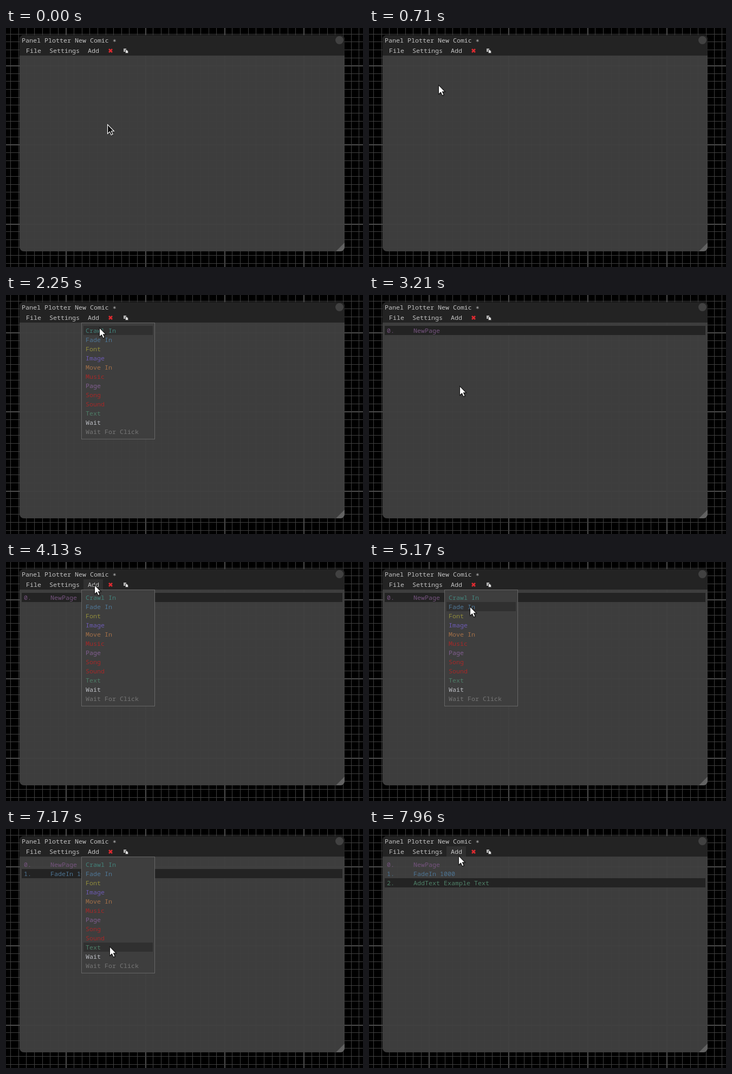
An HTML page with a canvas for the animation above (8000 ms loop, 659x442 px).

```html
<!DOCTYPE html>
<html lang="en">
<head>
<meta charset="utf-8">
<title>Comic editor</title>
<style>
html, body { margin: 0; width: 100%; height: 100%; overflow: hidden; background: #000; }
canvas { display: block; }
</style>
</head>
<body>
<canvas id="stage" width="659" height="442"></canvas>
<script>
const ctx = document.getElementById('stage').getContext('2d');
const LOOP = 8000, CHAR = 7, ROW = 17, ROW_TOP = 57, BAR_TOP = 32, BAR_END = 51;
const PLAIN = '#c4c4c4', PANEL = '#3e3e3e', HOVER = '#303030', DARK = '#232323';

const plain = labels => labels.map(label => ({ label, color: PLAIN }));
const tinted = pairs => Object.entries(pairs).map(([label, color]) => ({ label, color }));

const MENUS = [
  { label: 'File', items: plain(['New file', 'Load file', 'Save', 'Save to file']) },
  { label: 'Settings', items: plain(Array(4).fill(' '.repeat(39))) },
  { label: 'Add', items: tinted({
    'Crawl In': '#43827a', 'Fade In': '#4f7797', 'Font': '#928d3c', 'Image': '#6d5bb5',
    'Move In': '#a47048', 'Music': '#a52828', 'Page': '#805e90', 'Song': '#a52828',
    'Sound': '#a52828', 'Text': '#4e7d67', 'Wait': '#bcbec4', 'Wait For Click': '#767676'
  }) }
];

// Lay the menus out from their label lengths
let nextX = 37;
for (const m of MENUS) {
  m.x = nextX;
  nextX += m.label.length * CHAR + 15;
  m.left = m.x - 12;
  m.right = m.left + 38 + CHAR * Math.max(...m.items.map(i => i.label.length));
  m.bottom = BAR_END + 12 + ROW * m.items.length;
}

// Each session opens a menu and ends by adding a line
const SESSIONS = [
  { open: 1060, pick: 3210, label: 'NewPage', color: '#76547f' },
  { open: 4130, pick: 5500, label: 'FadeIn 1000', color: '#4d7493' },
  { open: 6000, pick: 7290, label: 'AddText Example Text', color: '#4f8068' }
];

// Pointer moves: start, end, x, y
const HOME = [187, 178];
const MOVES = [
  [300, 1080, 62, 41], [1300, 1880, 168, 40], [2050, 3040, 167, 168],
  [3210, 4000, 163, 42], [4130, 4880, 183, 111], [4930, 5210, 186, 79],
  [5500, 5830, 166, 42], [6000, 6830, 191, 217], [7290, 7960, 165, 49]
];

function pointer(t) {
  let [x, y] = HOME;
  for (const [start, end, tx, ty] of MOVES) {
    if (t <= start) break;
    const u = Math.min(1, (t - start) / (end - start));
    const e = (u + u * u * (3 - 2 * u)) / 2;
    const bow = Math.abs(ty - y) / 18 * Math.sin(Math.PI * u);
    x += (tx - x) * e + bow;
    y += (ty - y) * e;
  }
  return [Math.round(x), Math.round(y)];
}

function headerAt([x, y]) {
  if (y < BAR_TOP || y >= BAR_END) return;
  return MENUS.find(m => x >= m.x - 8 && x < m.x + m.label.length * CHAR + 7);
}

// The open menu belongs to the header touched last
function openMenu(t) {
  const session = SESSIONS.find(s => t >= s.open && t < s.pick);
  if (!session) return;
  for (let s = t; s >= session.open; s -= 10) {
    const m = headerAt(pointer(s));
    if (m) return m;
  }
  return headerAt(pointer(session.open));
}

function box(x1, y1, x2, y2, color) {
  ctx.fillStyle = color;
  ctx.fillRect(x1, y1, x2 - x1, y2 - y1);
}

function text(s, x, y, color = PLAIN) {
  ctx.fillStyle = color;
  ctx.fillText(s, x, y);
}

function poly(points, fill, stroke) {
  ctx.beginPath();
  points.forEach(([x, y]) => ctx.lineTo(x, y));
  ctx.closePath();
  if (fill) { ctx.fillStyle = fill; ctx.fill(); }
  if (stroke) { ctx.strokeStyle = stroke; ctx.stroke(); }
}

function grid() {
  box(0, 0, 659, 442, '#000');
  for (let k = -8; k < 40; k++) {
    const x = Math.round(110.4 + 14.62 * k), y = Math.round(69.2 + 14.62 * k);
    const major = k % 10 === 0, w = major ? 2 : 1, color = major ? '#4c4c4c' : '#404040';
    box(x, 0, x + w, 442, color);
    box(0, y, 659, y + w, color);
  }
}

function icons() {
  ctx.lineWidth = 2.6;
  ctx.strokeStyle = '#dc2a30';
  ctx.beginPath();
  ctx.moveTo(190, 39); ctx.lineTo(196, 45);
  ctx.moveTo(196, 39); ctx.lineTo(190, 45);
  ctx.stroke();
  box(217, 38, 222, 44, '#b0b0b0');
  ctx.lineWidth = 1;
  poly([[220.5, 40.5], [223, 40.5], [225.5, 43], [225.5, 46.5], [220.5, 46.5]], '#e0e0e0', '#4a4a4a');
}

function frame(at) {
  ctx.save();
  ctx.beginPath();
  ctx.roundRect(25, 13, 600, 400, 8);
  ctx.clip();
  box(25, 13, 625, 413, 'rgba(64,64,64,.965)');
  box(25, 13, 625, BAR_END, DARK);
  poly([[609, 413], [625, 397], [625, 413]], '#626262');
  ctx.restore();
  ctx.beginPath();
  ctx.arc(615.5, 22.5, 7.5, 0, 7);
  ctx.fillStyle = '#414141';
  ctx.fill();
  text('Panel Plotter New Comic \u2217', 29, 27);
  const hot = headerAt(at);
  for (const m of MENUS) {
    if (m === hot) box(m.x - 8, BAR_TOP, m.x + m.label.length * CHAR + 7, BAR_END, HOVER);
    text(m.label, m.x, 46);
  }
  icons();
}

function script(t) {
  const lines = SESSIONS.filter(s => t >= s.pick);
  lines.forEach(({ label, color }, i) => {
    const y = ROW_TOP + i * ROW;
    if (i === lines.length - 1) box(29, y, 621, y + ROW, DARK);
    text(i + '.', 33, y + 13, color);
    text(label, 82, y + 13, color);
  });
}

function popup({ left, right, bottom, items }, [px, py]) {
  box(left, BAR_END, right, bottom, '#666');
  box(left + 1, BAR_END + 1, right - 1, bottom - 1, PANEL);
  items.forEach(({ label, color }, i) => {
    const y = ROW_TOP + i * ROW;
    const hot = px >= left && px < right && py >= y && py < y + ROW;
    if (hot) box(left + 4, y, right - 4, y + ROW, HOVER);
    text(label, left + 8, y + 13, color);
  });
}

function arrow([x, y], dark) {
  const shape = [[0, 0], [0, 17], [4, 13.3], [6.7, 19.3], [9.6, 18], [7, 12.3], [12, 12.3]];
  ctx.save();
  ctx.translate(x + .5, y + .5);
  ctx.lineWidth = 1.1;
  ctx.shadowColor = 'rgba(0,0,0,.5)';
  ctx.shadowBlur = 2;
  ctx.shadowOffsetX = ctx.shadowOffsetY = 1;
  poly(shape, dark ? '#0c0c0c' : '#fff');
  ctx.shadowColor = 'transparent';
  poly(shape, null, dark ? '#fff' : '#181818');
  ctx.restore();
}

function draw(t) {
  const at = pointer(t), menu = openMenu(t);
  ctx.font = '11.667px "Noto Sans Mono", "DejaVu Sans Mono", monospace';
  grid();
  frame(at);
  script(t);
  if (menu) popup(menu, at);
  arrow(at, t < 40);
}

const start = performance.now();
function tick() {
  draw((performance.now() - start) % LOOP);
  requestAnimationFrame(tick);
}
tick();
</script>
</body>
</html>
```
